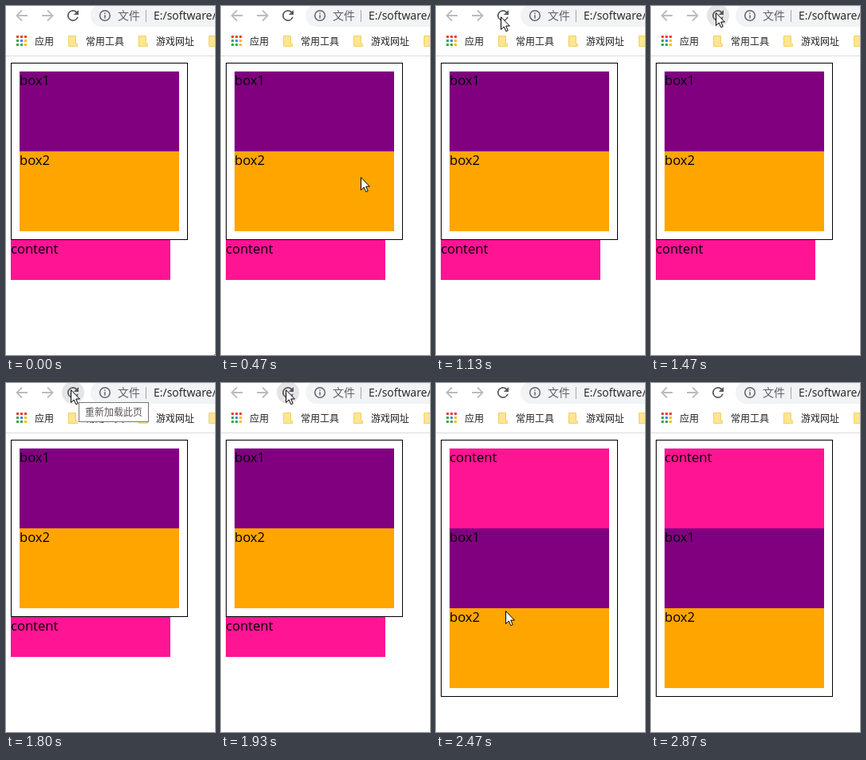
Animation, 262 px wide and 437 px high, one loop 3470 ms. Source, as an HTML page:

```html
<!DOCTYPE html>
<html lang="zh">
<head>
<meta charset="utf-8">
<title>Box order</title>
<style>
html, body { margin: 0; width: 100%; height: 100%; overflow: hidden; background: #fff; }
svg { display: block; }
text { font-family: "Open Sans", "Noto Sans CJK SC", "Noto Sans CJK", sans-serif; }
.label { font-size: 16.6px; }
.mark { font-size: 12px; fill: #202124; }
.hide { opacity: 0; }
</style>
</head>
<body>
<svg width="262" height="437" viewBox="0 0 262 437">
  <defs>
    <path id="folder" d="M.5.5H9.5V10.5H11.5V13.5H.5Z" fill="#fee590" stroke="#f0d066"/>
    <path id="arrow" d="M7 0H-6M0-6.5L-6.5 0 0 6.5" fill="none" stroke="#babcbe" stroke-width="1.8"/>
  </defs>

  <!-- toolbar -->
  <circle id="hover" class="hide" cx="84" cy="12" r="14" fill="#e4e5e6"/>
  <circle id="press" class="hide" cx="84" cy="12" r="14" fill="#d3d4d6"/>
  <use href="#arrow" x="20" y="12"/>
  <use href="#arrow" transform="translate(52 12) scale(-1 1)"/>
  <path transform="translate(73.4 1.4) scale(.88)" fill="#55585c" d="M17.65 6.35A8 8 0 1 0 19.73 14h-2.08A6 6 0 1 1 12 6c1.66 0 3.14.69 4.22 1.78L13 11h7V4z"/>
  <rect x="106" y="-2" width="200" height="28" rx="14" fill="#f1f3f4"/>
  <circle cx="124" cy="12" r="6.3" fill="none" stroke="#5f6368" stroke-width="1.5"/>
  <path d="M124 11.3V15.5M124 8.4V10" stroke="#5f6368" stroke-width="1.5"/>
  <text x="140" y="17" font-size="14" fill="#5f6368">文件</text>
  <path d="M175.5 5V20" stroke="#a5a8ac"/>
  <text x="185" y="17" font-size="14" fill="#202124">E:/software/</text>

  <!-- bookmarks -->
  <g id="apps"></g>
  <text class="mark" x="36" y="49">应用</text>
  <use href="#folder" x="78" y="37"/>
  <text class="mark" x="100" y="49">常用工具</text>
  <use href="#folder" x="166" y="37"/>
  <text class="mark" x="188" y="49">游戏网址</text>
  <use href="#folder" x="254" y="37"/>
  <path d="M0 62.5H262" stroke="#dadce0"/>

  <!-- page -->
  <g id="before"></g>
  <g id="after" class="hide"></g>

  <g id="tip" class="hide">
    <rect x="91.5" y="24.5" width="87" height="24" fill="#fff" stroke="#767676"/>
    <text x="99" y="41" font-size="12" fill="#575757">重新加载此页</text>
  </g>
  <path id="cursor" fill="#fff" stroke="#000" d="M.5.7V16.5L4.2 13 6.8 18.7 9.2 17.7 6.7 12H11.4Z"/>
</svg>
<script>
const LOOP = 3470;
const FPS = 15;
const $ = id => document.getElementById(id);

// Start of a tick in ms, rounded to hundredths of a second.
const timeOf = tick => Math.round(tick * 100 / FPS) * 10;

// Holds each value until the next step; steps are [tick, value].
function play(id, prop, steps) {
  const frames = steps.map(([tick, value]) =>
    ({ offset: timeOf(tick) / LOOP, [prop]: value, easing: 'step-end' }));
  frames.push({ offset: 1, [prop]: steps[steps.length - 1][1] });
  $(id).animate(frames, { duration: LOOP, iterations: Infinity });
}

function show(id, from, to) {
  const steps = from ? [[0, 0], [from, 1]] : [[0, 1]];
  if (to) steps.push([to, 0]);
  play(id, 'opacity', steps);
}

// Straight pointer moves, one position per tick.
function glide(x, y, moves) {
  const at = (px, py) => `translate(${px}px, ${py}px)`;
  const steps = [[0, at(x, y)]];
  for (const { start, ticks, to: [tx, ty] } of moves) {
    for (let i = 1; i <= ticks; i++) {
      const k = i / ticks;
      steps.push([start + i, at(Math.round(x + (tx - x) * k), Math.round(y + (ty - y) * k))]);
    }
    [x, y] = [tx, ty];
  }
  return steps;
}

const frame = h =>
  `<rect x="6.5" y="71.5" width="221" height="${h - 1}" fill="none" stroke="#000"/>`;
const block = (name, fill, x, y, h = 100) =>
  `<rect x="${x}" y="${y}" width="200" height="${h}" fill="${fill}"/>` +
  `<text class="label" x="${x}" y="${y + 17}">${name}</text>`;
const stack = (...items) => frame(items.length * 100 + 22) +
  items.map(([name, fill], i) => block(name, fill, 17, 82 + i * 100)).join('');

const box1 = ['box1', 'purple'];
const box2 = ['box2', 'orange'];
const content = ['content', 'deeppink'];
$('before').innerHTML = stack(box1, box2) + block(...content, 6, 293, 50);
$('after').innerHTML = stack(content, box1, box2);

const [red, green, blue, yellow] = ['#ea4335', '#34a853', '#4285f4', '#fbbc05'];
$('apps').innerHTML = [red, red, red, green, blue, yellow, green, green, yellow]
  .map((fill, i) => `<rect x="${13 + i % 3 * 5}" y="${37 + Math.floor(i / 3) * 5}" width="3" height="3" fill="${fill}"/>`)
  .join('');

play('cursor', 'transform', glide(261, 436, [
  { start: 0, ticks: 2, to: [219, 224] },
  { start: 6, ticks: 1, to: [175, 214] },
  { start: 7, ticks: 2, to: [123, 267] },
  { start: 11, ticks: 1, to: [101, 197] },
  { start: 12, ticks: 5, to: [81, 13] },
  { start: 17, ticks: 2, to: [130, 30] },
  { start: 19, ticks: 3, to: [81, 8] },
  { start: 35, ticks: 3, to: [90, 424] },
  { start: 41, ticks: 1, to: [85, 430] },
  { start: 42, ticks: 1, to: [85, 460] }
]));

const reload = 31;
show('hover', 22, 36);
show('press', reload, 36);
show('tip', 27, 29);
show('before', 0, reload);
show('after', reload);
</script>
</body>
</html>
```
